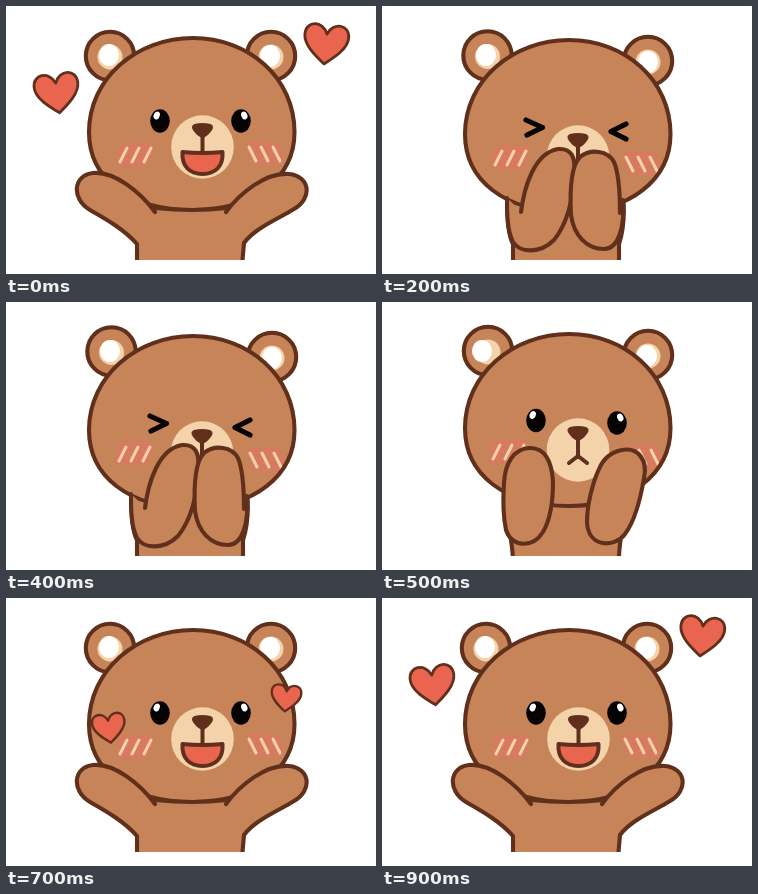
Animation of 370 by 268 pixels, one loop 1.1 s. Source, as an HTML page with a canvas:

```html
<!DOCTYPE html>
<html lang="en">
<head>
<meta charset="utf-8">
<title>Bear blowing hearts</title>
<style>
html, body { margin: 0; width: 100%; height: 100%; overflow: hidden; background: #fff; }
canvas { display: block; width: 370px; height: 268px; }
</style>
</head>
<body>
<canvas id="stage"></canvas>
<script>
const W = 370, H = 268, LOOP = 1100, STEP = 100, LAST = 9;
const FUR = '#c68458', LINE = '#60301c', CREAM = '#f4d3aa', RED = '#e96550',
      BLUSH = '#dc7861', INK = '#050303', WHITE = '#fff';

const canvas = document.getElementById('stage');
const ctx = canvas.getContext('2d');
const dpr = window.devicePixelRatio || 1;
canvas.width = W * dpr;
canvas.height = H * dpr;

function shape(d, fill, line, width = 4.1) {
  const p = new Path2D(d);
  if (fill) { ctx.fillStyle = fill; ctx.fill(p); }
  if (line) { ctx.strokeStyle = line; ctx.lineWidth = width; ctx.stroke(p); }
}

function oval(x, y, rx, ry, fill, line, turn = 0) {
  ctx.beginPath();
  ctx.ellipse(x, y, rx, ry, turn, 0, Math.PI * 2);
  ctx.fillStyle = fill;
  ctx.fill();
  if (line) { ctx.strokeStyle = line; ctx.lineWidth = 4.1; ctx.stroke(); }
}

function at(x, y, draw, turn = 0, sx = 1, sy = sx) {
  ctx.save();
  ctx.translate(x, y);
  ctx.rotate(turn);
  ctx.scale(sx, sy);
  draw();
  ctx.restore();
}

const HEAD = 'M187 32C243 32 288.5 72 288.5 126C288.5 171 249 204 187 204C122 204 83 172 83 126C83 72 131 32 187 32Z';

// ears: left x, y, right x, y; glint: the white inside each ear
const POSES = {
  open: {
    ears: [104, 50, 265, 50], glint: [103, 49, 264, 50],
    eyes: [154, 115, 235, 115], face: [196.5, 141], top: 0,
    blush: [129, 148, 259, 147], mouth: 'wide',
    torso: 'M131 260V237L149 203H221L238 237L236 260',
    arms: ['M131 260V238C118 223 98 212 84 204C65 193 67 169 87 167C109 165 135 187 149 206',
           'M236 260L238 237C249 222 272 213 288 203C307 192 304 170 283 168C260 166 234 187 220 206']
  },
  lifted: {
    ears: [105, 49, 265, 50], glint: [104, 49, 265, 50],
    eyes: [155, 117, 235, 118], face: [196, 144], top: 0,
    blush: [128, 150, 261, 149], mouth: 'small',
    torso: 'M131 260V237L156 203H211L238 237L236 260',
    arms: ['M131 260V238C118 222 104 208 91 196C76 181 82 160 100 159C118 158 140 186 156 210',
           'M236 260L238 238C250 222 265 208 281 194C297 180 290 161 273 161C250 160 226 188 211 210']
  },
  cheeks: {
    ears: [106, 49, 266, 53], glint: [100, 49, 265, 54],
    eyes: [154, 118.5, 235, 121], face: [196, 148], top: 0,
    blush: [126, 149, 261, 154], mouth: 'frown',
    torso: 'M126 188C122 214 131 236 131 260H237C236 240 245 214 241 188', sides: true,
    arms: ['M147 146C163 145 170 160 171 180C171 202 168 218 161 230C151 246 130 246 124 228C121 214 121 196 122 181C123 161 132 147 147 146Z',
           'M240 148C256 145 266 158 262 176C258 200 252 220 243 232C233 246 206 246 205 220C205 202 211 180 217 167C222 155 230 150 240 148Z']
  },
  hidden: {
    ears: [105.5, 49.5, 266, 55], glint: [104, 49, 266, 56],
    face: [196, 151], top: 2,
    blush: [128, 151, 260, 157],
    torso: 'M125 190C125 212 126 230 131 238V260H237V238C241 226 243 210 241 190', sides: true,
    arms: ['M139 206C142 182 152 147 176 143C190 142 194 152 192 168C191 196 184 219 172 234C158 248 138 247 131 236C125 224 125 208 125 192',
           'M238 207C238 190 237 168 232 156C226 145 209 142 198 151C188 161 188 190 189 209C192 230 205 243 222 243C236 243 243 222 241 194']
  }
};

function ears(p) {
  for (let i = 0; i < 4; i += 2) {
    const x = p.ears[i], y = p.ears[i + 1];
    oval(x, y, 24.2, 24.2, FUR, LINE);
    oval(x, y + 1, 12.5, 12.5, CREAM);
    oval(p.glint[i], p.glint[i + 1], 10, 11, WHITE);
  }
}

function cheek(x, y, lean) {
  at(x, y, () => {
    ctx.globalAlpha = 0.85;
    shape('M-12 -11H16Q20 -11 18 -2L14 10Q13 12 10 12H-15Q-20 11 -18 5Q-17 -9 -12 -11Z', BLUSH);
    ctx.globalAlpha = 1;
    for (const dx of [-12, 0, 12])
      shape(`M${dx - 3} 8L${dx + 4} -6`, null, CREAM, 3);
  }, 0, lean, 1);
}

function head(p) {
  ctx.save();
  ctx.translate(0, p.top);
  shape(HEAD, FUR);
  ctx.clip(new Path2D(HEAD));
  ctx.translate(0, -p.top);
  cheek(p.blush[0], p.blush[1], 1);
  cheek(p.blush[2], p.blush[3], -1);
  ctx.restore();
  at(0, p.top, () => shape(HEAD, null, LINE));
}

function eyes(p) {
  if (!p.eyes) {
    shape('M144 114L160.5 121.5L145 129M244 118L229 125.5L244 133', null, INK, 5.2);
    return;
  }
  for (let i = 0; i < 2; i++) {
    const x = p.eyes[i * 2], y = p.eyes[i * 2 + 1], side = i ? 1 : -1;
    oval(x, y, 9.8, 11.7, INK);
    oval(x + 3.3 * side, y - 5.5, 3, 4, WHITE, null, i ? -0.4 : 0.4);
  }
}

const MOUTHS = {
  wide: ['M0 -10V5M-20 5Q0 7 20 5C21 19 13 27 0 27C-13 27 -21 19 -20 5Z', RED],
  small: ['M0 -10V7M-17 8Q0 9 16 8C17 18 10 23 0 23C-10 23 -17 18 -17 8Z', RED],
  frown: ['M0 -10V7M-9 13L0 6L9 13', null]
};

function muzzle(p) {
  at(p.face[0], p.face[1], () => {
    oval(0, 0, 31.3, 31.7, CREAM);
    const [d, fill] = MOUTHS[p.mouth] || ['M0 -10V4', null];
    shape(d, fill, LINE, 4);
    shape('M-8 -23Q0 -25 8 -23C13 -21 10 -16 4 -11Q0 -8 -4 -11C-10 -16 -13 -21 -8 -23Z', LINE);
  });
}

function heart(x, y, width, turn) {
  const s = width / 46;
  at(x, y, () => shape(
    'M0 20C-9 13 -22 3 -22 -8C-22 -22 -5 -23 0 -10C5 -23 22 -22 22 -8C22 3 9 13 0 20Z',
    RED, LINE, 2.8 / Math.sqrt(s)), turn, s);
}

function bear(p) {
  if (p.sides) shape(p.torso, FUR, LINE);
  ears(p);
  head(p);
  muzzle(p);
  eyes(p);
  for (const arm of p.arms) shape(arm, FUR);
  // raised arms run into the torso, so its fill hides the seam
  if (!p.sides) {
    shape(p.torso, FUR);
    at(0, p.top, () => shape('M149 202Q187 206 221 202', null, LINE));
  }
  for (const arm of p.arms) shape(arm, p.sides && FUR, LINE);
}

// x, y, width of the left heart, then of the right one
const FLIGHT = [
  [129, 145, 28, 260, 125, 25],
  [103, 130, 34, 280, 100, 31],
  [77, 107, 40, 301, 67, 39],
  [51, 87, 46, 320, 38, 46]
];

const ORDER = ['open', 'cheeks', 'hidden', 'hidden', 'hidden', 'cheeks', 'lifted', 'open', 'open', 'open'];

function draw(step) {
  ctx.setTransform(dpr, 0, 0, dpr, 0, 0);
  ctx.fillStyle = WHITE;
  ctx.fillRect(0, 0, W, H);
  ctx.lineCap = ctx.lineJoin = 'round';
  ctx.save();
  ctx.beginPath();
  ctx.rect(0, 0, W, 254);
  ctx.clip();
  bear(POSES[ORDER[step]]);
  const f = step === 0 ? FLIGHT[3] : FLIGHT[step - 6];
  if (f) {
    heart(f[0], f[1], f[2], -0.13);
    heart(f[3], f[4], f[5], 0.1);
  }
  ctx.restore();
}

const start = performance.now();
let shown = -1;
function tick() {
  const t = (performance.now() - start) % LOOP;
  const step = Math.min(LAST, Math.floor(t / STEP));
  if (step !== shown) draw(shown = step);
  requestAnimationFrame(tick);
}
tick();
</script>
</body>
</html>
```
